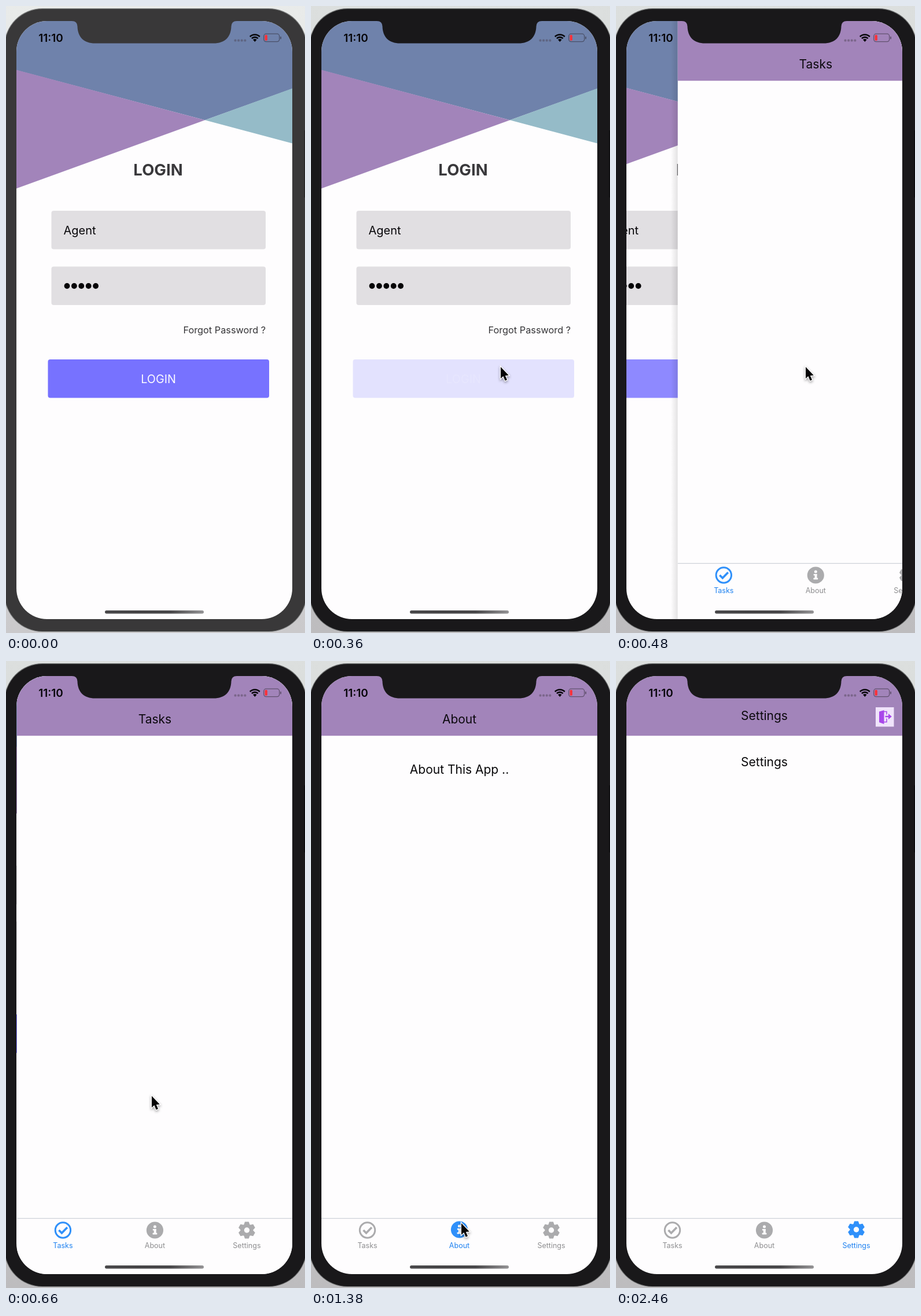
Animation, 517 px wide and 1084 px high, one loop 2520 ms. Source, as an HTML page with a canvas:

```html
<!DOCTYPE html>
<html lang="en">
<head>
<meta charset="utf-8">
<title>Login and tabs</title>
<style>
  html, body { margin: 0; width: 100%; height: 100%; overflow: hidden; background: #e4e4e5; }
  canvas { display: block; width: 517px; height: 1084px; }
</style>
</head>
<body>
<canvas id="stage" width="517" height="1084"></canvas>
<script>
const ctx = document.getElementById('stage').getContext('2d');
const LOOP = 2520, STEP = 60;
const LEFT = 18, TOP = 26, WIDTH = 477, RIGHT = LEFT + WIDTH, BOTTOM = 1060;
const WHITE = '#fefdfe', PURPLE = '#a284ba', BLUE = '#6f82ab', TEAL = '#95bbc8';
const FONT = 'Inter, "Liberation Sans", sans-serif';

// Times in ms
const ACTIVATE = 240, PRESS = 250, RELEASE = 377, ABOUT = 1200, SETTINGS = 1740;
const CURSOR_END = 2440;

// Cursor stops: time, x, y
const route = [
  [60, 530, 770], [230, 328, 624], [500, 328, 624], [660, 252, 752],
  [960, 260, 972], [1420, 260, 972], [1660, 413, 975], [2220, 413, 975],
  [CURSOR_END, 456, 96]
];

const clamp = v => Math.max(0, Math.min(1, v));
const inOut = v => v < .5 ? 2 * v * v : 1 - 2 * (1 - v) ** 2;

function text(str, x, y, size, color, weight = 400, align = 'center') {
  ctx.font = `${weight} ${size}px ${FONT}`;
  ctx.textAlign = align;
  ctx.fillStyle = color;
  ctx.fillText(str, x, y);
}

function rect(x, y, w, h, color, r = 0) {
  ctx.fillStyle = color;
  ctx.beginPath();
  ctx.roundRect(x, y, w, h, r);
  ctx.fill();
}

function circle(x, y, r, color) {
  ctx.fillStyle = color;
  ctx.beginPath();
  ctx.arc(x, y, r, 0, Math.PI * 2);
  ctx.fill();
}

function trace(points) {
  ctx.beginPath();
  points.forEach(([x, y]) => ctx.lineTo(x, y));
}

function poly(points, color) {
  trace(points);
  ctx.closePath();
  ctx.fillStyle = color;
  ctx.fill();
}

function line(points, color, width) {
  trace(points);
  ctx.strokeStyle = color;
  ctx.lineWidth = width;
  ctx.stroke();
}

function gradient(x0, y0, x1, y1, ...colors) {
  const g = ctx.createLinearGradient(x0, y0, x1, y1);
  colors.forEach((c, i) => g.addColorStop(i / (colors.length - 1), c));
  return g;
}

function body(active) {
  const back = active ? ['#dcdfde', '#bdbcbe'] : ['#e9ebea', '#cac9cb'];
  rect(0, 0, 517, 1084, gradient(0, 0, 0, 1084, ...back));
  rect(-3, 4, 523, 1078, active ? '#6b6d6d' : '#7b7d7d', 66);
  rect(-2, 5.3, 521, 1075.7, active ? '#19181a' : '#393839', 65);
  rect(515.5, 215, 2, 116, active ? '#0b0a0c' : '#262527');
}

function notch(active) {
  const l = 123, r = 390, b = 64.5;
  ctx.fillStyle = active ? '#19181a' : '#393839';
  ctx.beginPath();
  ctx.moveTo(l - 9, TOP - 1);
  ctx.lineTo(l - 9, TOP);
  ctx.quadraticCurveTo(l, TOP, l + .5, 35);
  ctx.bezierCurveTo(l + 1, 54, l + 12, b, l + 31, b);
  ctx.lineTo(r - 31, b);
  ctx.bezierCurveTo(r - 12, b, r - 1, 54, r - .5, 35);
  ctx.quadraticCurveTo(r, TOP, r + 9, TOP);
  ctx.lineTo(r + 9, TOP - 1);
  ctx.fill();
}

function statusBar() {
  text('11:10', 77.5, 61.5, 19, '#060508', 600);
  for (let i = 0; i < 4; i++) rect(394.5 + i * 5.6, 57.5, 4, 4, 'rgba(70,60,75,.42)', 1.5);

  // Wi-Fi
  ctx.strokeStyle = '#060508';
  ctx.lineWidth = 2.6;
  for (const r of [12, 7.6]) {
    ctx.beginPath();
    ctx.arc(430.3, 61.5, r, -Math.PI * .75, -Math.PI * .25);
    ctx.stroke();
  }
  ctx.fillStyle = '#060508';
  ctx.beginPath();
  ctx.moveTo(430.3, 62);
  ctx.arc(430.3, 61.5, 4.6, -Math.PI * .75, -Math.PI * .25);
  ctx.fill();

  // Battery
  ctx.strokeStyle = 'rgba(45,40,50,.55)';
  ctx.lineWidth = 1.3;
  ctx.beginPath();
  ctx.roundRect(445.7, 48.2, 27, 13.4, 4);
  ctx.stroke();
  rect(474.2, 52.7, 1.8, 4.6, 'rgba(45,40,50,.55)', 1);
  rect(447.5, 50, 4.4, 9.8, '#f8323a', 1.5);
}

function login(t) {
  rect(0, TOP, RIGHT + 200, BOTTOM - TOP, WHITE);
  const cross = [344, 197.3];
  poly([[LEFT, TOP], [RIGHT, TOP], [RIGHT, 143], cross, [LEFT, 111]], BLUE);
  poly([[LEFT, 110.5], cross, [LEFT, 315.5]], PURPLE);
  poly([[RIGHT, 142.5], cross, [RIGHT, 237.5]], TEAL);

  text('LOGIN', 263, 293, 27.5, '#3a393c', 700);
  rect(78.5, 354, 370.5, 66.5, '#e1dfe2', 4);
  rect(78.5, 450.5, 370.5, 66.5, '#e1dfe2', 4);
  text('Agent', 99.5, 394.5, 20, '#08070a', 400, 'left');
  for (let i = 0; i < 5; i++) circle(105.5 + i * 12.4, 484, 4.9, '#050406');
  text('Forgot Password ?', 449, 566, 16.3, '#353437', 400, 'right');

  const down = inOut(clamp((t - PRESS) / 92));
  const up = inOut(clamp((t - RELEASE) / 153));
  ctx.globalAlpha = 1 - .8 * down * (1 - up);
  rect(72.5, 611, 382.5, 66.5, '#7772ff', 4);
  text('LOGIN', 263.5, 651.5, 19.8, '#fbfaff');
  ctx.globalAlpha = 1;
}

function checkIcon(x, y, color) {
  ctx.strokeStyle = color;
  ctx.lineWidth = 3;
  ctx.beginPath();
  ctx.arc(x, y, 13.2, 0, Math.PI * 2);
  ctx.stroke();
  line([[x - 7, y], [x - 2, y + 5], [x + 7.5, y - 4.8]], color, 3.6);
}

function infoIcon(x, y, color) {
  circle(x, y, 14.6, color);
  circle(x, y - 6, 2.5, WHITE);
  rect(x - 3.6, y - 2, 5.8, 2.6, WHITE, .5);
  rect(x - 1.7, y - 2, 3.9, 9, WHITE);
  rect(x - 3.8, y + 4.8, 7.6, 2.7, WHITE, .5);
}

function gearIcon(x, y, color) {
  circle(x, y, 10.8, color);
  for (let i = 0; i < 6; i++) {
    ctx.save();
    ctx.translate(x, y);
    ctx.rotate(i * Math.PI / 3);
    poly([[-5.4, -8.5], [-3.4, -14.6], [3.4, -14.6], [5.4, -8.5]], color);
    ctx.restore();
  }
  circle(x, y, 4.7, WHITE);
}

const tabs = [['Tasks', checkIcon], ['About', infoIcon], ['Settings', gearIcon]];

function tabBar(current) {
  rect(LEFT, 963, WIDTH, 1.2, '#cdd2d8');
  tabs.forEach(([name, icon], i) => {
    const x = LEFT + WIDTH * (i + .5) / 3, on = i === current;
    icon(x, on && i ? 983 : 984, on ? '#2f90fa' : '#ababad');
    text(name, x, 1015, 12.5, on ? '#1f82f0' : '#8e8e90');
  });
}

function logoutIcon() {
  const c = '#a948ea';
  rect(449, 80, 31.5, 33.5, '#f0e4fb');
  poly([[455, 87.5], [463.5, 85], [463.5, 109], [455, 106]], c);
  line([[463, 87.5], [468, 87.5], [468, 92.5]], c, 1.5);
  line([[463, 105.5], [468, 105.5], [468, 99.5]], c, 1.5);
  line([[465.5, 96], [472, 96]], c, 2.4);
  poly([[471, 91], [476.8, 96], [471, 101]], c);
}

function home(current) {
  const mid = LEFT + WIDTH / 2;
  rect(LEFT, TOP, WIDTH, BOTTOM - TOP, WHITE);
  rect(LEFT, TOP, WIDTH, 103.3, PURPLE);
  text(tabs[current][0], mid, current === 2 ? 101.5 : 108, 21, '#0c090e');
  if (current === 1) text('About This App ..', mid, 194.5, 21, '#09080a');
  if (current === 2) {
    text('Settings', mid, 181.5, 21, '#09080a');
    logoutIcon();
  }
  tabBar(current);
}

// Critically damped spring: distance left, from 1 to 0
function springLeft(t) {
  const u = Math.max(0, t - RELEASE) * .03;
  return (1 + u) * Math.exp(-u);
}

function cursor(t) {
  if (t < route[0][0] || t > CURSOR_END) return;
  const i = route.findIndex(p => p[0] >= t);
  const b = route[i], a = route[Math.max(0, i - 1)];
  const k = inOut(clamp((t - a[0]) / (b[0] - a[0] || 1)));
  ctx.save();
  ctx.translate(a[1] + (b[1] - a[1]) * k, a[2] + (b[2] - a[2]) * k);
  trace([[0, 0], [0, 20], [4.4, 16], [7.6, 23.8], [11, 22.3], [7.8, 14.9], [13.8, 14.6]]);
  ctx.closePath();
  ctx.save();
  ctx.shadowColor = 'rgba(0,0,0,.4)';
  ctx.shadowBlur = 4;
  ctx.shadowOffsetY = 2;
  ctx.strokeStyle = '#fff';
  ctx.lineWidth = 2.6;
  ctx.stroke();
  ctx.restore();
  ctx.fillStyle = '#050405';
  ctx.fill();
  ctx.restore();
}

function draw(t) {
  const active = t >= ACTIVATE;
  body(active);

  ctx.save();
  ctx.beginPath();
  ctx.roundRect(LEFT, TOP, WIDTH, BOTTOM - TOP, 53);
  ctx.clip();
  const left = springLeft(t), shift = left * WIDTH;
  if (left > .001) {
    ctx.save();
    ctx.translate(-.3 * (WIDTH - shift), 0);
    login(t);
    ctx.restore();
  }
  if (left < 1) {
    const edge = LEFT + shift;
    if (left > .01) {
      rect(edge - 12, TOP, 12, BOTTOM - TOP,
        gradient(edge - 12, 0, edge, 0, 'rgba(0,0,0,0)', 'rgba(0,0,0,.11)'));
    }
    ctx.save();
    ctx.translate(shift, 0);
    home(t < ABOUT ? 0 : t < SETTINGS ? 1 : 2);
    ctx.restore();
  }
  rect(171, 1045, 171, 5.5, gradient(171, 0, 342, 0, '#4a494b', '#454446', '#49484a', '#959496'), 2.8);
  statusBar();
  ctx.restore();

  notch(active);
  cursor(t);
}

const start = performance.now();
function tick(now) {
  const t = Math.max(0, now - start) % LOOP;
  draw(Math.floor(t / STEP) * STEP);
  requestAnimationFrame(tick);
}
draw(0);
requestAnimationFrame(tick);
</script>
</body>
</html>
```
